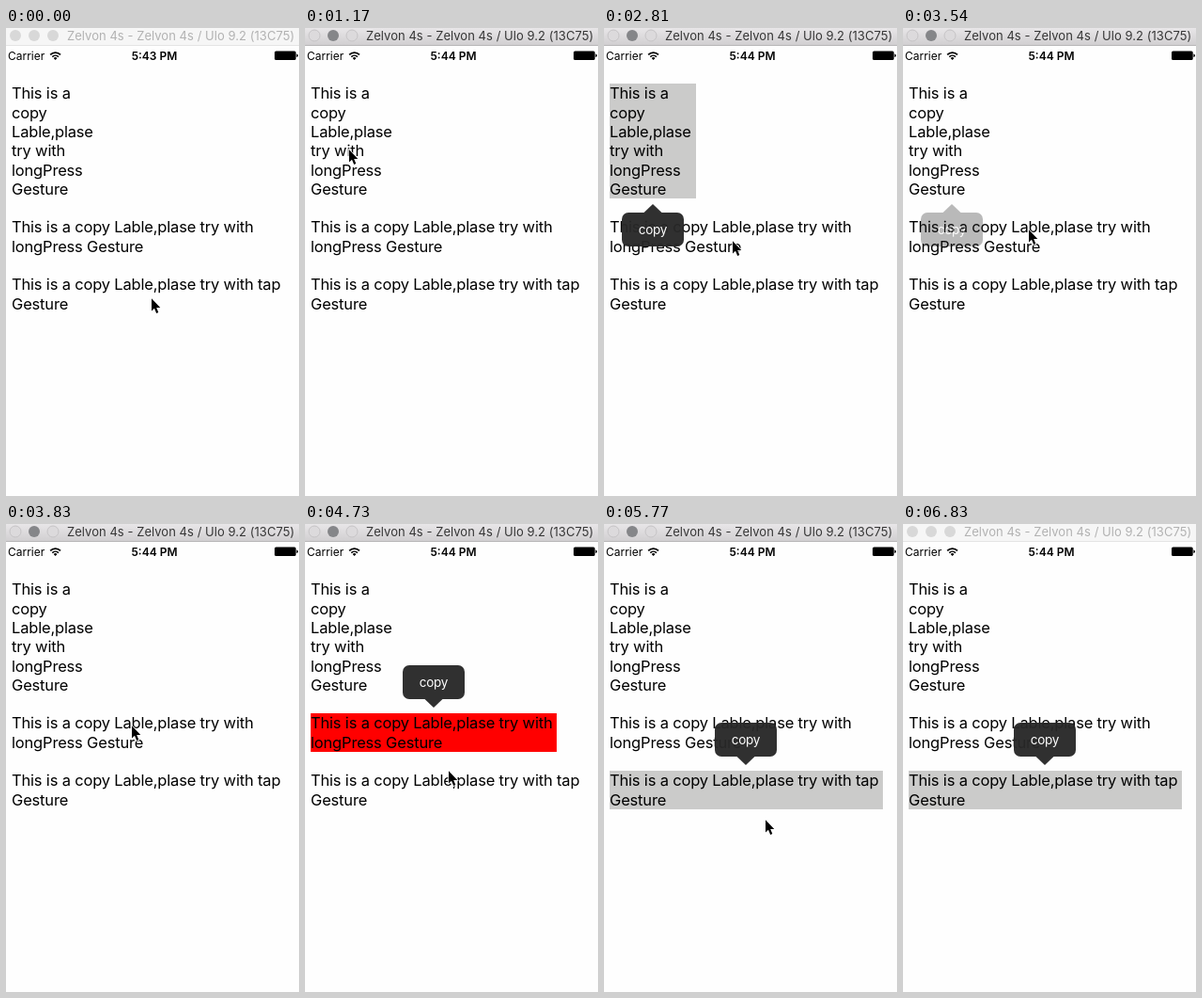
Write an HTML page that moves like this. It is 312 px wide and 497 px high and loops after 6930 ms.

```html
<!DOCTYPE html>
<html lang="en">
<head>
<meta charset="utf-8">
<title>Copy label</title>
<style>
  html, body { margin: 0; width: 100%; height: 100%; overflow: hidden; background: #fefefe; }
  svg { display: block; width: 312px; height: 497px; }
  text { font-family: Inter, Roboto, "Liberation Sans", sans-serif; font-optical-sizing: none; }
  .title { font-size: 13px; letter-spacing: .04px; fill: #b2b2b2; }
  .status { font-size: 12px; }
  .label { font-size: 16.5px; letter-spacing: -.18px; }
  .copy { font-size: 13.5px; letter-spacing: -.25px; fill: #fff; text-anchor: middle; }
  .bar { fill: #f6f6f6; }
  .edge { fill: #e4e4e4; }
  .dot { fill: #d8d8d8; }
  .active .title { fill: #363636; }
  .active .bar { fill: url(#grad); }
  .active .edge { fill: #b8b6b8; }
  .active .dot { fill: #dcdadc; stroke: #c6c4c6; }
  .active .dot.mid { fill: #858689; stroke: none; }
</style>
</head>
<body>
<svg viewBox="0 0 312 497">
  <defs>
    <linearGradient id="grad" x2="0" y2="1">
      <stop stop-color="#e8e6e8"/><stop offset="1" stop-color="#d1cfd1"/>
    </linearGradient>
  </defs>
  <rect width="312" height="497" fill="#fefefe"/>
  <g id="window">
    <rect class="bar" width="312" height="18"/>
    <rect class="edge" y="18" width="312" height="1"/>
    <circle class="dot" cx="10" cy="8" r="6"/>
    <circle class="dot mid" cx="30" cy="8" r="6"/>
    <circle class="dot" cx="50" cy="8" r="6"/>
    <text class="title" x="65" y="13">Zelvon 4s - Zelvon 4s / Ulo 9.2 (13C75)</text>
  </g>

  <text class="status" x="2" y="33.6">Carrier</text>
  <g fill="none" stroke="#000" stroke-width="1.7">
    <path d="M47.2 28.3a7.6 7.6 0 0 1 10.8 0M49.3 30.6a4.7 4.7 0 0 1 6.6 0"/>
    <path d="M52.6 34l-1.9-2a2.7 2.7 0 0 1 3.8 0z" fill="#000" stroke="none"/>
  </g>
  <text id="clock" class="status" x="158" y="33.6" font-weight="600" text-anchor="middle"></text>
  <rect x="286" y="24.5" width="22.7" height="9.5" rx="1.6"/>
  <path d="M309.4 27.6q1.6 .3 1.6 1.7t-1.6 1.7z"/>

  <g id="labels"></g>
  <g id="menus"></g>
  <path id="cursor" d="M1 1.2V14.6L4 11.8 6.2 17 8.3 16.1 6.2 11.1H10.3Z"
        stroke="#fff" stroke-width="1.4" paint-order="stroke"/>
</svg>
<script>
const $ = id => document.getElementById(id);
const LOOP = 6930, TICK = 148, LINE = 20.3, LEFT = 6;

// "on" and "off" are the ticks at which a label's menu opens and closes
const labels = [
  { w: 92, color: "#cbcbca", on: 11, off: 23,
    lines: ["This is a", "copy", "Lable,plase", "try with", "longPress", "Gesture"] },
  { w: 262, color: "#f00", on: 28, off: 36,
    lines: ["This is a copy Lable,plase try with", "longPress Gesture"] },
  { w: 291, color: "#cbcbca", on: 37, off: Infinity,
    lines: ["This is a copy Lable,plase try with tap", "Gesture"] }
];

// The menu sits above its label, or below it when there is no room
function menu(x, top, bottom) {
  const below = top < 100;
  const y = below ? bottom + 15 : top - 51;
  const base = below ? y : y + 36;
  const tip = below ? y - 9 : y + 45;
  return `<g><g fill="#282828" fill-opacity=".96">
    <rect x="${x - 33}" y="${y}" width="66" height="36" rx="7"/>
    <path d="M${x - 9.5} ${base}L${x} ${tip}L${x + 9.5} ${base}z"/></g>
    <text class="copy" x="${x}" y="${y + 23}">copy</text></g>`;
}

let y = 59, labelArt = "", menuArt = "";
for (const { w, color, lines } of labels) {
  const h = Math.round(lines.length * LINE);
  labelArt += `<rect x="${LEFT}" y="${y}" width="${w}" height="${h}" fill="${color}"/>` +
    lines.map((s, i) => `<text class="label" x="${LEFT}" y="${y + 16.4 + i * LINE}">${s}</text>`).join("");
  menuArt += menu(LEFT + Math.floor(w / 2), y, y + h);
  y += h + 20;
}
$("labels").innerHTML = labelArt;
$("menus").innerHTML = menuArt;

const marks = $("labels").querySelectorAll("rect");
const bubbles = $("menus").children;

// Cursor moves, in ticks; a higher power slows down more at the end
const moves = [
  { from: 0, to: 7, x: 46, y: 128, pow: 1 },
  { from: 14, to: 18, x: 138, y: 234, pow: 1 },
  { from: 18, to: 22, x: 133, y: 213, pow: 2 },
  { from: 31, to: 32, x: 152, y: 261, pow: 1 },
  { from: 32, to: 34, x: 154, y: 279, pow: 1 },
  { from: 38, to: 43, x: 270, y: 506, pow: .73 }
];
const clamp = v => Math.max(0, Math.min(1, v));

function cursorAt(n) {
  let x = 154, y = 286;
  for (const m of moves) {
    const u = 1 - (1 - clamp((n - m.from) / (m.to - m.from))) ** m.pow;
    x += (m.x - x) * u;
    y += (m.y - y) * u;
  }
  return [Math.round(x), Math.round(y)];
}

function draw(t) {
  const n = Math.floor((t + 20) / TICK);
  $("window").classList.toggle("active", n >= 8 && t < 6830);
  $("clock").textContent = n < 4 ? "5:43 PM" : "5:44 PM";
  labels.forEach(({ on, off }, i) => {
    marks[i].setAttribute("opacity", n >= on && n < off ? 1 : 0);
    const fadeIn = clamp((n - on + 1) / 2), fadeOut = clamp((off - n + 2) / 3);
    bubbles[i].setAttribute("opacity", fadeIn * fadeOut);
  });
  $("cursor").setAttribute("transform", `translate(${cursorAt(n)})`);
}

const start = performance.now();
function loop() {
  draw((performance.now() - start) % LOOP);
  requestAnimationFrame(loop);
}
loop();
</script>
</body>
</html>
```
